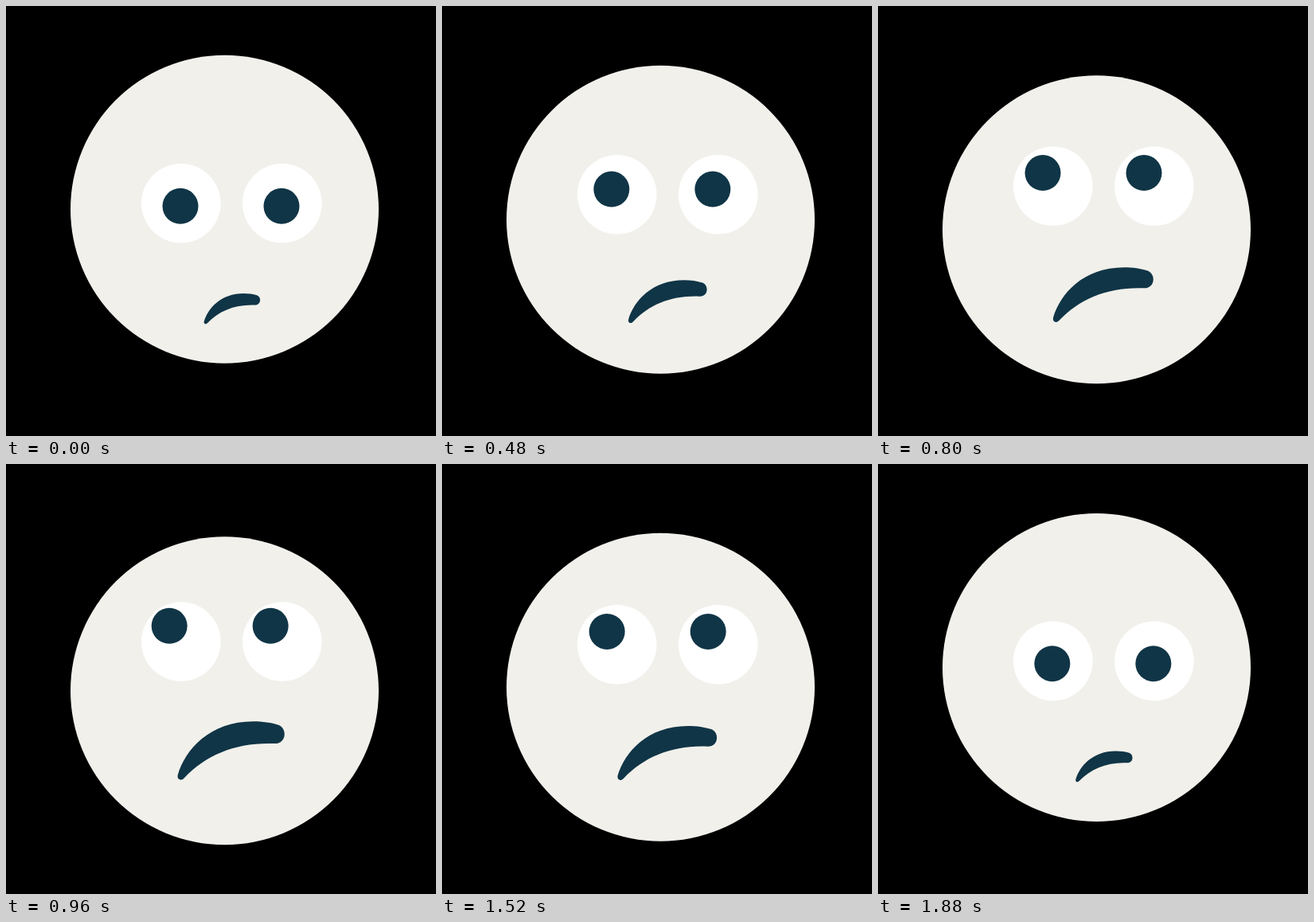
An HTML page with a canvas for the animation above (1920 ms loop, 540x540 px).

```html
<!DOCTYPE html>
<html lang="en">
<head>
<meta charset="utf-8">
<title>Doubtful face</title>
<style>
html, body { margin: 0; width: 100%; height: 100%; overflow: hidden; background: #000; }
canvas { display: block; width: 540px; height: 540px; }
</style>
</head>
<body>
<canvas id="stage" width="540" height="540"></canvas>
<script>
const ctx = document.getElementById('stage').getContext('2d');
const LOOP = 1920, STEP = 40, PEAK = 1320;
const FACE = '#f1f0eb', WHITE = '#fff', INK = '#103546';

// Mouth at full size, in stage coordinates around MOUTH
const MOUTH = { x: 282.4, y: 358 };
const mouth = new Path2D(
  'M212.3 389.5C222 357 254 319.3 312 319.3C324 319.3 336 321 345 324' +
  'C350 326 353 330.5 353 336C353 343.5 347.5 348.8 340 348.5' +
  'C290 346.5 250 363 221 393.5C219 395.8 217 396.6 215 396' +
  'C212.5 395.2 211.4 392.5 212.3 389.5Z');

const mix = (a, b, p) => a + (b - a) * p;

// Cubic easing with flat ends; x1 and x2 are the handle positions in time
function ease(x, x1, x2) {
  let lo = 0, hi = 1, s = x;
  for (let i = 0; i < 30; i++) {
    s = (lo + hi) / 2;
    const r = 1 - s;
    if (3 * s * r * r * x1 + 3 * s * s * r * x2 + s * s * s < x) lo = s;
    else hi = s;
  }
  return s * s * (3 - 2 * s);
}

function lift(t) {
  return t < PEAK
    ? ease(t / PEAK, 0.333, 0.45)
    : 1 - ease((t - PEAK) / (LOOP - PEAK), 0.39, 0.65);
}

function disc(x, y, r, color) {
  ctx.fillStyle = color;
  ctx.beginPath();
  ctx.arc(x, y, r, 0, Math.PI * 2);
  ctx.fill();
}

function draw(t) {
  const p = lift(t);
  ctx.fillStyle = '#000';
  ctx.fillRect(0, 0, 540, 540);
  disc(274.5, mix(255.2, 287.8, p), 193.5, FACE);

  for (const dx of [0, 127]) {
    disc(219.8 + dx, mix(247.7, 220.5, p), 49.8, WHITE);
    disc(mix(219, 203.7, p) + dx, mix(251.3, 198.2, p), 22.5, INK);
  }

  const size = mix(0.5, 1, p);
  ctx.save();
  ctx.translate(mix(283.8, MOUTH.x, p), mix(380.3, MOUTH.y, p));
  ctx.scale(size, size);
  ctx.translate(-MOUTH.x, -MOUTH.y);
  ctx.fillStyle = INK;
  ctx.fill(mouth);
  ctx.restore();
}

const start = performance.now();
function tick() {
  const t = (performance.now() - start) % LOOP;
  draw(Math.floor(t / STEP) * STEP);
  requestAnimationFrame(tick);
}
tick();
</script>
</body>
</html>
```
